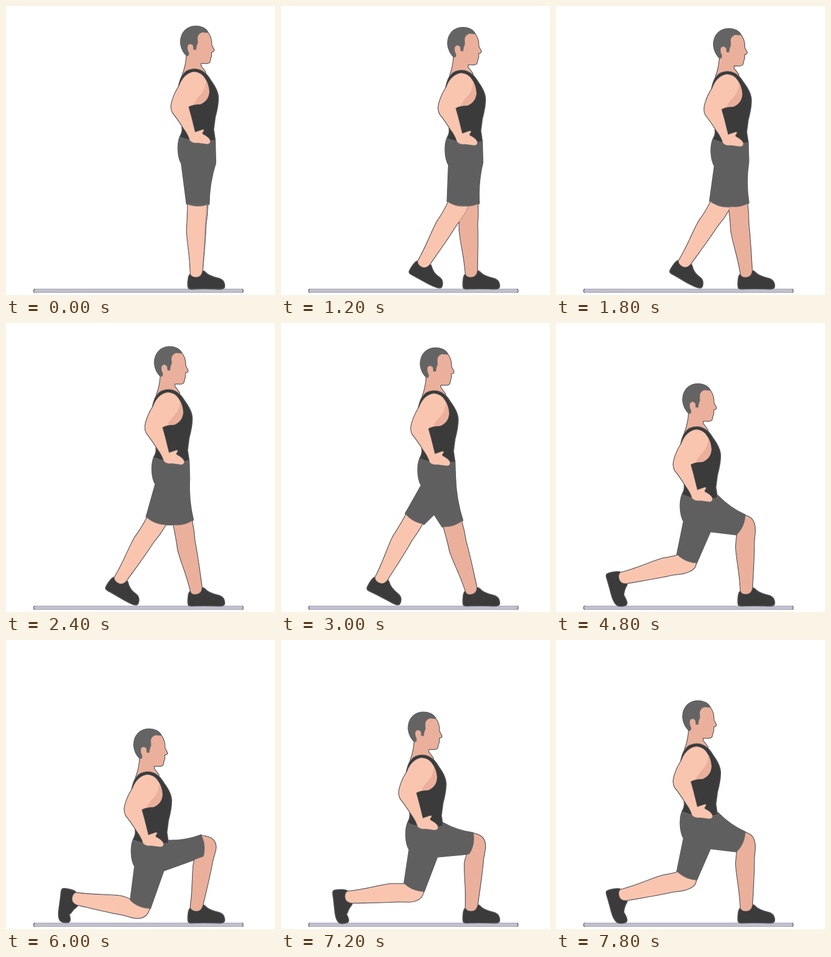
An HTML page that plays this animation: 512 px wide and 550 px high, repeating every 8 s.

```html
<!DOCTYPE html>
<html lang="en">
<head>
<meta charset="utf-8">
<title>Reverse lunge</title>
<style>
  html, body { margin: 0; width: 100%; height: 100%; overflow: hidden; background: #fff; }
  svg { display: block; width: 100%; height: 100%; }
  .skin { fill: #f9c5af; }
  .shade { fill: #ebb09b; }
  .dark { fill: #3b3b3b; }
  .grey { fill: #5f5f5f; }
  .hair { fill: #646464; }
</style>
</head>
<body>
<svg viewBox="0 0 512 550">
  <defs>
    <g id="figure" stroke-linejoin="round">
      <path id="farShoe" class="dark"/>
      <path id="farCalf" class="shade"/>
      <path id="nearShoe" class="dark"/>
      <path id="nearCalf" class="skin"/>
      <path id="shorts" class="grey"/>
      <g id="torso">
        <path class="shade" d="M384 50Q390 58 391 67L391.500 75L396 83.500Q396.500 87 391 87.500L391 95Q389 100 388 106Q386 110 378 109H371V114Q375 119 380 126L360 150L336 130Q342 115 343.500 96L340 70L365 48Z"/>
        <path class="hair" d="M345 95.500Q334 86 332.300 70C332 50 345 38.500 361 38.500C372 38.500 381 43 384.500 51L373 50Q364 54 364.500 62L365 70Q362 76 361.500 83.500L357 83L356.500 76Q351 69 346 75Q344 82 348 89Q349 94 345 95.500Z"/>
        <path class="dark" d="M328.500 153Q333 130 344 123Q359 116 372 122.500Q380 126 390 142Q404 161 404 175Q404 190 398 212L395 235L398 255Q365 263 331 249Q337 238 335 231L345 200Z"/>
        <path class="skin" d="M329.500 152Q338 128 358 125Q372 126 379 138Q386 148 387 163Q386 180 370 187Q356 187 347.500 192L352.500 210L360 240L373 235.500Q378 234 376 238.500Q371 243 378 245.500Q389 252 389 258Q388 264 380 262.500L365 260.500Q355 262 350 256Q347 245 338 233Q326 214 317 203Q312.500 195 315.500 183Q320 166 329.500 152Z"/>
        <path class="shade" stroke="none" d="M380.500 142Q386 150 386.500 163Q386 180 370 186.500L357 187.500Q361 178 370 169Q381 157 380.500 142Z"/>
      </g>
    </g>
  </defs>
  <rect x="52.500" y="538.500" width="399" height="7" rx="2" fill="#c0bfcd" stroke="#a9a9b4" stroke-width="1"/>
  <path d="M55 538.500Q52.500 538.500 52.500 542T55 545.500M449 538.500Q451.500 538.500 451.500 542T449 545.500" fill="none" stroke="#444" stroke-width="1"/>
  <use href="#figure" stroke="#30323a" stroke-width="2"/>
  <use href="#figure" stroke="#777" stroke-opacity=".55" stroke-width="1.200"/>
</svg>
<script>
const STEP = 600, LOOP = 8000, FLOOR = 538;
const THIGH = 100, SHIN = 121, HEM = 41;
const HIP = [366, 285], KNEE = [4, -SHIN], FAR_ANKLE = [362, 508];

// Key poses: step, body shift x y, rear ankle x y, front shin angle
const KEYS = [
  [0, 0, 0, 362, 508, 0],
  [1, -2, .5, 336, 502, -1],
  [2, -15, 2.5, 271, 489, -4],
  [5, -67, 9, 190, 487, -17.5],
  [7, -87, 44.5, 137, 486, -8.5],
  [8, -91, 77.5, 128, 485, -2],
  [9, -90, 99, 130, 489, 3],
  [10, -89, 131, 134, 492, 8.3]
];

const el = id => document.getElementById(id);
const clamp = (v, lo, hi) => Math.min(hi, Math.max(lo, v));
const mix = (a, b, u) => a.map((v, i) => v + (b[i] - v) * u);
const add = (a, b, k = 1) => a.map((v, i) => v + b[i] * k);
const unit = ([x, y]) => [x / Math.hypot(x, y), y / Math.hypot(x, y)];
const turn = ([x, y], a) => [x * Math.cos(a) - y * Math.sin(a), x * Math.sin(a) + y * Math.cos(a)];
const at = p => p.map(v => v.toFixed(2)).join(' ') + ' ';

function poseAt(step) {
  const i = Math.max(1, KEYS.findIndex(key => key[0] >= step));
  const a = KEYS[i - 1], b = KEYS[i];
  return mix(a, b, (step - a[0]) / (b[0] - a[0]));
}

// Shin angle that joins ankle and hip with fixed bone lengths
function shinAngle(ankle, hip) {
  const [dx, dy] = add(hip, ankle, -1);
  const d = Math.min(Math.hypot(dx, dy), THIGH + SHIN);
  const bend = Math.acos((SHIN ** 2 + d ** 2 - THIGH ** 2) / (2 * SHIN * d));
  return Math.atan2(dx, -dy) + bend - Math.atan2(KNEE[0], SHIN);
}

// Curve from a to b that bulges sideways
function bow(a, b, depth) {
  const [dx, dy] = unit(add(b, a, -1));
  return `Q${at(add(mix(a, b, .5), [-dy, dx], 2 * depth))}${at(b)}`;
}

// Closed curve that rounds every corner
function smooth(points) {
  const mid = i => mix(points[i], points[(i + 1) % points.length], .5);
  return 'M' + at(mid(points.length - 1)) + points.map((p, i) => `Q${at(p)}${at(mid(i))}`).join('') + 'Z';
}

// The heel follows the shin, the toes pitch no lower than the floor
function shoe(ankle, angle) {
  const reach = clamp(14 + angle * 90 / Math.PI, 30, 48);
  const heel = p => add(ankle, turn(p, angle));
  const ball = heel([reach, 30]);
  const pitch = Math.min(angle, Math.asin(clamp((FLOOR - ball[1]) / 24, -1, 1)));
  const toe = p => add(ball, turn(p, pitch));
  return smooth([
    ...[[-11, 1], [-15, 8], [-16, 25], [-14, 31], [0, 30]].map(heel), ball,
    ...[[22, 1], [25, -6], [20, -18]].map(toe),
    ...[[32, 8], [20, 2], [13, -6], [0, 0]].map(heel)
  ]);
}

function leg(hip, ankle, angle) {
  const knee = add(ankle, turn(KNEE, angle));
  const thigh = unit(add(knee, hip, -1));
  const shin = unit(add(ankle, knee, -1));
  const center = add(knee, thigh, -10);
  const [nx, ny] = unit(add(thigh, shin, .15));
  const back = add(center, [ny, -nx], -HEM / 2), front = add(center, [ny, -nx], HEM / 2);
  const p = (x, y) => at(add(ankle, turn([x, y], angle)));
  const calf = `M${at(mix(back, front, .05))}Q${p(-15, -102)}${p(-17, -83)}` +
    `C${p(-17, -60)}${p(-11, -35)}${p(-11, 2)}Q${p(-9, 8)}${p(0, 8)}Q${p(10, 8)}${p(12, -4)}` +
    `C${p(14, -30)}${p(17.5, -60)}${p(18.5, -92)}L${p(21, -112)}Q${p(22, -138)}${at(mix(front, back, .03))}Z`;
  return { thigh, back, front, calf };
}

function shorts(body, hip, near, far) {
  const b = (x, y) => add([x, y], body);
  const direction = leg => Math.atan2(leg.thigh[1], leg.thigh[0]);
  const spread = (direction(near) - direction(far)) / 2;
  const drop = Math.min(92, 28 / Math.max(Math.sin(spread), .01));
  const crotch = add(hip, unit(add(near.thigh, far.thigh)), drop);
  const fold = b(399, 299 - 50 * far.thigh[0]);
  return `M${at(b(331, 249))}C${at(b(326, 262))}${at(b(326, 286))}${at(b(334, 300))}` +
    `L${at(near.back)}${bow(near.back, near.front, 4)}L${at(crotch)}L${at(far.back)}` +
    `${bow(far.back, far.front, 4)}${bow(far.front, fold, -3)}` +
    `L${at(b(398, 255))}Q${at(b(365, 263))}${at(b(331, 249))}Z`;
}

function draw(step) {
  const [, x, y, ankleX, ankleY, farDegrees] = poseAt(step);
  const body = [x, y], hip = add(HIP, body), ankle = [ankleX, ankleY];
  const angle = shinAngle(ankle, hip);
  const near = leg(hip, ankle, angle);
  const far = leg(hip, FAR_ANKLE, farDegrees * Math.PI / 180);
  const set = (id, d) => el(id).setAttribute('d', d);

  el('torso').setAttribute('transform', `translate(${x} ${y})`);
  set('farShoe', shoe(FAR_ANKLE, 0));
  set('farCalf', far.calf);
  set('nearShoe', shoe(ankle, step ? angle : 0));
  set('nearCalf', near.calf);
  set('shorts', shorts(body, hip, near, far));
}

// Ten steps down, a hold, then back up
const start = performance.now();
let shown = -1;
function tick() {
  const i = Math.floor((performance.now() - start) % LOOP / STEP);
  const step = i <= 10 ? i : 21 - i;
  if (step !== shown) draw(shown = step);
  requestAnimationFrame(tick);
}
tick();
</script>
</body>
</html>
```
